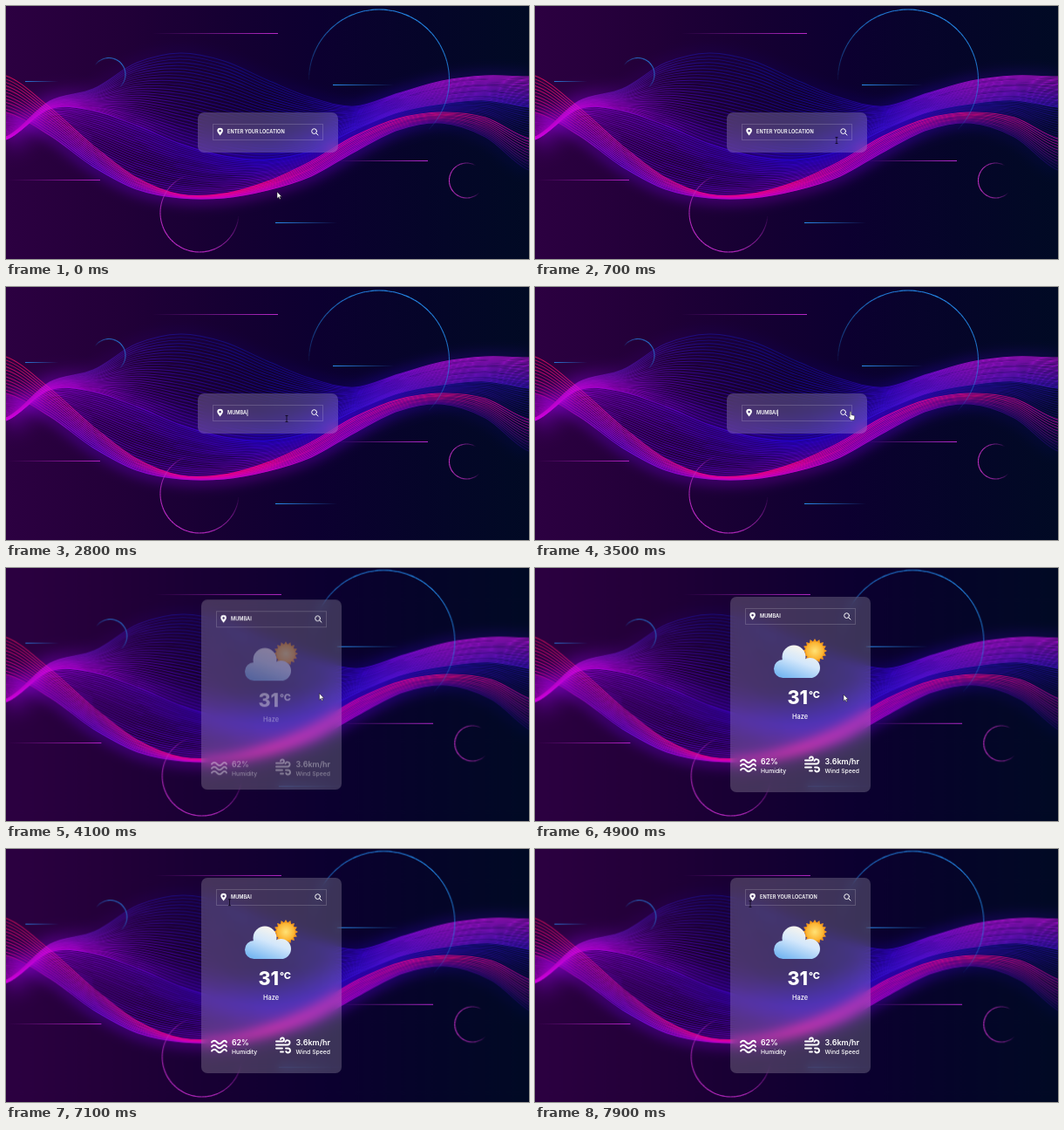
Animation, 600 px wide and 290 px high, one loop 8000 ms. Source, as an HTML page with a canvas:

```html
<!DOCTYPE html>
<html lang="en">
<head>
<meta charset="utf-8">
<title>Weather card</title>
<style>
html, body { margin: 0; width: 600px; height: 290px; overflow: hidden; background: #12002f; }
canvas, #card, #pointer { position: absolute; left: 0; top: 0; }
canvas { transform-origin: 0 0; }
#card {
  width: 161px; border-radius: 7px; overflow: hidden;
  background: rgba(255, 255, 255, .2); backdrop-filter: blur(6px);
}
svg { display: block; }
text { font-family: Inter, sans-serif; font-weight: 600; fill: #fff; }
.label { font-weight: 500; }
.big { font-weight: 800; }
.icon { fill: none; stroke: #fff; stroke-linecap: round; }
</style>
</head>
<body>
<canvas id="sky" width="600" height="290"></canvas>
<div id="card">
  <svg width="161" height="224">
    <defs>
      <linearGradient id="cloud" gradientUnits="userSpaceOnUse" x1="82" y1="56" x2="68" y2="94">
        <stop offset="0" stop-color="#fbf6ec"/><stop offset=".45" stop-color="#d3e7fb"/><stop offset="1" stop-color="#79b8f2"/>
      </linearGradient>
      <radialGradient id="sun">
        <stop offset="0" stop-color="#ffe276"/><stop offset="1" stop-color="#fbb02c"/>
      </radialGradient>
    </defs>
    <rect x="17.5" y="13.5" width="126" height="18" fill="none" stroke="#fff" stroke-opacity=".17"/>
    <path fill="#fff" fill-rule="evenodd" d="M25.6 26.5C23.5 23.8 22.3 22.6 22.3 21.1A3.3 3.3 0 0 1 28.9 21.1C28.9 22.6 27.7 23.8 25.6 26.5ZM25.6 19.8a1.3 1.3 0 1 0 .01 0Z"/>
    <text id="city" x="34" y="24.2" font-size="5.6"></text>
    <rect id="caret" y="18.5" width=".8" height="7.5" fill="#fff"/>
    <g class="icon" stroke-width="1"><circle cx="133.6" cy="21.6" r="2.9"/><path d="M135.8 23.8L138 26"/></g>
    <g id="weather">
      <polygon id="rays" fill="#f2981f"/>
      <circle cx="97" cy="62" r="10.5" fill="url(#sun)"/>
      <g fill="url(#cloud)">
        <circle cx="73" cy="69" r="13.5"/><circle cx="60.5" cy="82.5" r="10.5"/>
        <circle cx="91.5" cy="81.5" r="11.5"/><rect x="60" y="73" width="31" height="20"/>
      </g>
      <text class="big" x="65.5" y="123" font-size="21.5">31</text>
      <text class="big" x="90" y="115.5" font-size="11">°C</text>
      <text class="label" x="80" y="140" font-size="7.4" text-anchor="middle">Haze</text>
      <g class="icon" stroke-width="1.9">
        <path d="M12 188.5q3 -3.4 6 0t6 0t5 0M12 193.5q3 -3.4 6 0t6 0t5 0M12 198.5q3 -3.4 6 0t6 0t5 0"/>
        <path d="M86 187.5h7a2 2 0 1 0 -2 -2.5M86 191.5h13a2.6 2.6 0 1 0 -2.5 -3.5M86 195.5h7M91 199.5h3M97 195.5h2.5a2.5 2.5 0 1 1 -2.3 3.5"/>
      </g>
      <text x="35" y="191.5" font-size="8.7">62%</text>
      <text class="label" x="35" y="202.3" font-size="6.8">Humidity</text>
      <text x="108.5" y="191.5" font-size="9">3.6km/hr</text>
      <text class="label" x="108.5" y="202.3" font-size="6.8">Wind Speed</text>
    </g>
  </svg>
</div>
<svg id="pointer" width="600" height="290">
  <path id="arrow" d="M0 0V7.5L1.8 5.9L3 8.5L4.2 8L3 5.5H5.3Z" fill="#fff" stroke="#111" stroke-width=".5"/>
  <path id="beam" d="M-1.5 -3.5H1.5M0 -3.5V3.5M-1.5 3.5H1.5" fill="none" stroke="#0b0418" stroke-width=".8"/>
  <path id="hand" d="M-.8 0Q0 -1 .8 0V3.5L4 4.3Q5 4.6 4.8 6L4.2 9.5H.2L-2.2 6Q-2 4.8 -.8 5.7Z" fill="#fff" stroke="#111" stroke-width=".5"/>
</svg>
<script>
const $ = id => document.getElementById(id);
const clamp = v => Math.min(1, Math.max(0, v));
const mix = (a, b, t) => a + (b - a) * t;
const ctx = $('sky').getContext('2d');

// Blend two #rgb colours
function blend(a, b, t) {
  const channel = i => Math.round(17 * mix(parseInt(a[i], 16), parseInt(b[i], 16), t));
  return `rgb(${channel(1)}, ${channel(2)}, ${channel(3)})`;
}

function gradient(x0, x1, colors) {
  const g = ctx.createLinearGradient(x0, 0, x1, 0);
  colors.forEach((c, i) => g.addColorStop(i / (colors.length - 1), c));
  return g;
}

// Smooth path through heights spaced 50 px apart
function curve(ys) {
  const slope = i => ((ys[i + 1] ?? ys[i]) - (ys[i - 1] ?? ys[i])) / 6;
  ctx.beginPath();
  ctx.moveTo(0, ys[0]);
  for (let i = 0; i < ys.length - 1; i++) {
    const x = i * 50;
    ctx.bezierCurveTo(x + 17, ys[i] + slope(i), x + 33, ys[i + 1] - slope(i + 1), x + 50, ys[i + 1]);
  }
}

// Lines spread between two curves; colours are space-separated and blend across
function ribbon(from, to, count, fromColors, toColors, alpha) {
  const a = fromColors.split(' '), b = toColors.split(' ');
  ctx.globalAlpha = alpha;
  ctx.lineWidth = .9;
  for (let i = 0; i < count; i++) {
    const t = i / (count - 1);
    ctx.strokeStyle = gradient(0, 600, a.map((c, k) => blend(c, b[k], t)));
    curve(from.map((y, k) => mix(y, to[k], t)));
    ctx.stroke();
  }
}

function glow(ys, width, blur, colors, alpha) {
  ctx.filter = `blur(${blur}px)`;
  ctx.globalAlpha = alpha;
  ctx.lineWidth = width;
  ctx.strokeStyle = gradient(0, 600, colors.split(' '));
  curve(ys);
  ctx.stroke();
  ctx.filter = 'none';
}

// Arc that is brightest halfway and fades at both ends
function ring(x, y, r, start, end, color) {
  const n = 60, rad = Math.PI / 180, step = (end - start) / n;
  ctx.strokeStyle = color;
  ctx.lineWidth = 1.1;
  for (let i = 0; i < n; i++) {
    ctx.globalAlpha = Math.sin(Math.PI * (i + .5) / n) ** .7;
    ctx.beginPath();
    ctx.arc(x, y, r, (start + i * step) * rad, (start + (i + 1) * step) * rad);
    ctx.stroke();
  }
}

function streak(tail, head, y, color) {
  ctx.globalAlpha = 1;
  ctx.fillStyle = gradient(tail, head, [color + '00', color]);
  ctx.fillRect(Math.min(tail, head), y, Math.abs(head - tail), 1);
}

function paintSky() {
  const top = [150, 109, 95, 65, 54, 63, 85, 105, 115, 100, 86, 80, 81];
  const middle = [153, 118, 120, 137, 158, 172, 176, 166, 142, 122, 112, 108, 116];
  const crest = [80, 116, 160, 197, 216, 215, 201, 178, 149, 129, 122, 128, 152];
  const base = [122, 148, 184, 210, 220, 220, 211, 195, 167, 142, 134, 150, 188];

  ctx.fillStyle = gradient(0, 600, ['#2c0041', '#230039', '#170033', '#0c0030', '#050529', '#010a24']);
  ctx.fillRect(0, 0, 600, 290);

  ctx.globalCompositeOperation = 'lighter';
  glow(middle, 30, 11, '#508 #306 #207 #20d #20b #106 #104', .45);
  glow(base, 14, 7, '#506 #40a #609 #708 #508 #104 #002', .4);
  glow(top, 10, 7, '#607 #204 #003 #003 #107 #409 #308', .3);

  // Keep the brightest line so that tight bundles do not burn out
  ctx.globalCompositeOperation = 'lighten';
  ribbon(top, middle, 30, '#c0c #51a #119 #119 #30c #c1e #d1e', '#c0d #a0c #50b #20c #41e #81d #41d', .68);
  ribbon(middle, base, 28, '#b0c #80d #40d #20d #30c #21a #219', '#80a #50c #60d #a0c #60b #307 #104', .65);
  ribbon(crest, base, 12, '#e15 #d1a #e08 #f07 #f08 #e06 #c0a', '#b08 #71d #b0c #d0c #a0c #408 #105', .8);

  ctx.globalCompositeOperation = 'source-over';
  ring(428, 84.5, 80.5, 180, 405, '#2588e8');
  ring(118, 78.5, 19, 215, 410, '#2a78d8');
  ring(222, 237, 45, 5, 250, '#c02cc8');
  ring(528.5, 200, 20, 45, 300, '#c832c8');
  streak(168, 312, 31, '#b828c8');
  streak(445, 375, 90, '#2a90f0');
  streak(60, 22, 86, '#2a78d8');
  streak(2, 108, 199, '#b020c0');
  streak(378, 484, 177, '#b828d0');
  streak(380, 309, 248, '#2a90f0');
}

paintSky();

$('rays').setAttribute('points', Array.from({ length: 32 }, (_, i) => {
  const r = i % 2 ? 11 : 14, a = i * Math.PI / 16;
  return [97 + r * Math.cos(a), 62 + r * Math.sin(a)].map(v => v.toFixed(1)).join();
}).join(' '));

// Time, x, y and pointer shape from that time on
const path = [
  [0, 311, 213, 'arrow'], [500, 344, 156, 'beam'], [700, 346, 154, 'beam'],
  [1300, 322, 151, 'beam'], [3000, 322, 151, 'beam'], [3350, 362, 143, 'hand'],
  [3800, 362, 143, 'arrow'], [4600, 354, 145, 'arrow'], [5100, 354, 145, 'arrow'],
  [6200, 274, 43, 'arrow'], [6400, 274, 43, 'arrow'], [6700, 284, 56, 'beam'],
  [7300, 247, 63, 'beam'], [8000, 247, 63, 'beam']
];

function movePointer(t) {
  const i = path.findIndex(p => p[0] > t);
  const [t0, x0, y0, shape] = path[i - 1], [t1, x1, y1] = path[i];
  const k = (t - t0) / (t1 - t0), e = k * k * (3 - 2 * k);
  for (const id of ['arrow', 'beam', 'hand']) $(id).style.display = id === shape ? '' : 'none';
  $(shape).setAttribute('transform', `translate(${mix(x0, x1, e)} ${mix(y0, y1, e)})`);
}

function frame(now) {
  const t = now % 8000, wide = t >= 3800;
  const open = 1 - (1 - clamp((t - 3800) / 450)) ** 3;
  const height = mix(46, 224, open);
  $('sky').style.transform = wide ? 'translateY(-1.5px) scale(1.0125)' : 'none';
  $('card').style.height = height + 'px';
  $('card').style.transform = `translate(${wide ? 224 : 220}px, ${145 - height / 2}px)`;
  $('weather').style.opacity = clamp((t - 3950) / 400);

  const typed = t < 7400 ? 'MUMBAI'.slice(0, Math.max(0, Math.floor((t - 2150) / 120))) : '';
  $('city').textContent = typed || 'ENTER YOUR LOCATION';
  $('caret').style.display = typed && !wide ? '' : 'none';
  if (typed) $('caret').setAttribute('x', 34.4 + $('city').getComputedTextLength());

  movePointer(t);
  requestAnimationFrame(frame);
}
requestAnimationFrame(frame);
</script>
</body>
</html>
```
